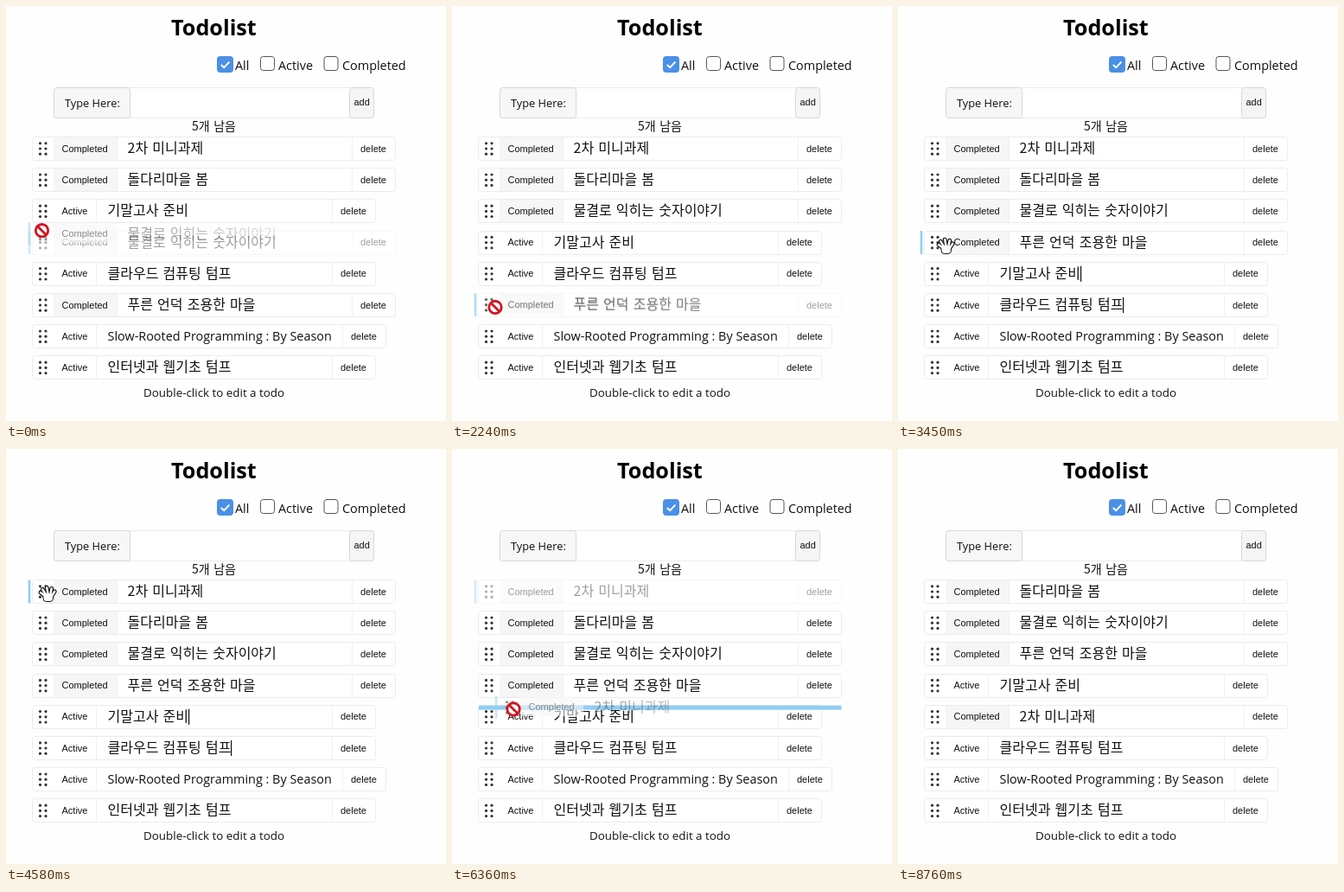
These frames come from a looping animation (509 px wide and 480 px high, 8.79 s). An HTML page with a canvas:

```html
<!DOCTYPE html>
<html lang="ko">
<head>
<meta charset="utf-8">
<title>Todolist</title>
<style>
html, body { margin: 0; width: 100%; height: 100%; overflow: hidden; background: #fefefe; }
canvas { display: block; }
</style>
</head>
<body>
<canvas id="stage" width="509" height="480"></canvas>
<script>
const ctx = document.getElementById('stage').getContext('2d');
const LOOP = 8790;
const PITCH = 36.2;
const BLUE = '#92cdf3';
const INK = '#111';
const KOREAN = '"Noto Sans CJK KR", "Noto Sans CJK", sans-serif';
const LATIN = '"Open Sans", "Noto Sans", sans-serif';
const BUTTON = '11px "Liberation Sans", Arial, sans-serif';

const todos = [
  { text: '2차 미니과제', done: true },
  { text: '돌다리마을 봄', done: true },
  { text: '기말고사 준비', caretFrom: 2700 },
  { text: '물결로 익히는 숫자이야기', done: true },
  { text: '클라우드 컴퓨팅 텀프', caretFrom: 3170 },
  { text: '푸른 언덕 조용한 마을', done: true },
  { text: 'Slow-Rooted Programming : By Season', latin: true },
  { text: '인터넷과 웹기초 텀프' },
];

// Each drag carries a row from one gap between rows to another.
const drags = [
  { start: -33, end: 890, row: 3, gap: 2, grab: { x: 41.5, y: 269.5 }, drop: { x: 47, y: 227 } },
  { start: 2240, end: 3170, row: 5, gap: 3, grab: { x: 50, y: 349 }, drop: { x: 54, y: 277 } },
  { start: 4950, end: 7060, row: 0, gap: 5, grab: { x: 47, y: 167 }, drop: { x: 75.6, y: 301 } },
];
const cursorGone = 7450;

const rowY = i => 165 + PITCH * i;
const gapY = i => 147 + PITCH * i;
const mix = (a, b, k) => a + (b - a) * k;
const progress = (t, from, to) => Math.min(1, Math.max(0, (t - from) / (to - from)));
const smooth = k => k * k * (3 - 2 * k);
const dash = k => 1 - (1 - k) ** 7;
const glide = u => smooth(progress(u, 0.34, 0.78));

function cursorAt(t) {
  const i = drags.findLastIndex(d => t >= d.start);
  const { start, end, grab, drop } = drags[i];
  if (t < end) {
    const u = progress(t, start, end);
    return { x: mix(grab.x, drop.x, glide(u)), y: mix(grab.y, drop.y, dash(u)) };
  }
  const next = drags[i + 1];
  if (!next) return drop;
  const k = smooth(progress(progress(t, end, next.start), 0.15, 0.75));
  return { x: mix(drop.x, next.grab.x, k), y: mix(drop.y, next.grab.y, k) };
}

function orderAt(t) {
  const order = [...todos];
  for (const { end, row, gap } of drags) {
    if (t < end) break;
    const [moved] = order.splice(row, 1);
    order.splice(gap > row ? gap - 1 : gap, 0, moved);
  }
  return order;
}

function label(text, x, y, font, color = INK, spacing = 0) {
  ctx.font = font;
  ctx.fillStyle = color;
  ctx.wordSpacing = spacing + 'px';
  ctx.fillText(text, x, y);
}

function box(x, y, w, h, radius, fill, stroke) {
  ctx.beginPath();
  ctx.roundRect(x, y, w, h, radius);
  ctx.fillStyle = fill;
  ctx.fill();
  if (!stroke) return;
  ctx.lineWidth = 1;
  ctx.strokeStyle = stroke;
  ctx.stroke();
}

function rect(x, y, w, h, fill) {
  ctx.fillStyle = fill;
  ctx.fillRect(x, y, w, h);
}

function line(points, width, color) {
  ctx.beginPath();
  points.forEach(([x, y]) => ctx.lineTo(x, y));
  ctx.lineWidth = width;
  ctx.strokeStyle = color;
  ctx.stroke();
}

function itemText({ text, done, latin }, y, color) {
  const x = done ? 140.5 : 117.5;
  if (latin) label(text, x, y + 5, '14.4px ' + LATIN, color);
  else label(text, x, y + 5, '16px ' + KOREAN, color, 1.6);
  return x + ctx.measureText(text).width;
}

function handleDots(y, color) {
  ctx.fillStyle = color;
  for (let i = 0; i < 6; i++) {
    ctx.beginPath();
    ctx.arc(39.5 + 6.5 * (i % 2), y + 6.2 * (Math.floor(i / 2) - 1), 1.6, 0, 7);
    ctx.fill();
  }
}

function drawRow(item, y, hovered, caret) {
  const { done, latin } = item;
  const top = Math.round(y - 14) + 0.5;
  const chipEnd = done ? 128 : 104;
  const right = done ? 450.5 : latin ? 439.5 : 427.5;
  box(30.5, top, right - 30.5, 27, 3, '#fff', '#ececec');
  if (done) rect(55, top + 0.5, chipEnd - 55, 26, '#f6f6f6');
  for (const x of [chipEnd, right - 50.5]) rect(x, top + 0.5, 1, 26, '#f0f0f0');
  handleDots(y, '#333');
  label(done ? 'Completed' : 'Active', 64.5, y + 3.5, BUTTON);
  label('delete', right - 40.5, y + 3.5, BUTTON);
  const end = itemText(item, y, INK);
  if (caret) rect(Math.round(end), y - 9, 1.2, 18, INK);
  if (hovered) rect(25.7, y - 13.5, 2.6, 27, BLUE);
}

function drawGhost(item, dx, y) {
  const fade = (rgb, alpha) => {
    const gradient = ctx.createLinearGradient(100, 0, 390, 0);
    gradient.addColorStop(0, `rgba(${rgb},${alpha})`);
    gradient.addColorStop(1, `rgba(${rgb},0)`);
    return gradient;
  };
  const ink = fade('20,20,20', 0.48);
  ctx.save();
  ctx.translate(dx, 0);
  rect(25.7, y - 13, 2.6, 26, fade('146,205,243', 0.5));
  rect(55, y - 13, 73, 23, fade('247,247,247', 0.62));
  handleDots(y, ink);
  label('Completed', 64.5, y + 3.5, BUTTON, ink);
  itemText(item, y, ink);
  ctx.restore();
}

function drawNoDrop({ x, y }) {
  const red = '#cf1620';
  ctx.beginPath();
  ctx.arc(x, y, 7.2, 0, 7);
  ctx.fillStyle = '#fff';
  ctx.fill();
  ctx.lineWidth = 2.8;
  ctx.strokeStyle = red;
  ctx.stroke();
  line([[x - 5, y - 5], [x + 5, y + 5]], 2.8, red);
}

function drawHand({ x, y }) {
  const fingers = Array.from({ length: 5 }, (_, i) => {
    const angle = mix(-2.5, -1, i / 4);
    const length = 5 + 4 * Math.sin(Math.PI * i / 4);
    const baseX = -4 + 2.4 * i, baseY = 2;
    return [[baseX, baseY], [baseX + length * Math.cos(angle), baseY + length * Math.sin(angle)]];
  });
  ctx.save();
  ctx.translate(x + 1, y);
  ctx.lineCap = 'round';
  for (const finger of fingers) line(finger, 4.8, INK);
  box(-5, 0, 11.5, 9.5, 3.5, '#fff', INK);
  for (const finger of fingers) line(finger, 2.5, '#fff');
  ctx.restore();
}

function drawPage() {
  const body = '14.4px ' + LATIN;
  label('Todolist', 191, 34, 'bold 25.2px ' + LATIN, '#000');
  box(244, 58, 19, 19, 4, '#4a90e6');
  line([[248.8, 68], [252.2, 71.2], [258.4, 64.6]], 2, '#fff');
  for (const x of [294.5, 368]) box(x, 58.5, 16, 16, 3, '#fff', '#555');
  label('All', 265, 73.5, body);
  label('Active', 315, 73.5, body);
  label('Completed', 389, 73.5, body);

  box(55.5, 94.5, 370, 35, 3, '#fff', '#ebebeb');
  box(55.5, 94.5, 88, 35, 3, '#f7f7f7', '#d8d8d8');
  box(397.5, 94.5, 28, 35, 3, '#f5f5f5', '#d8d8d8');
  label('Type Here:', 68, 117, '12.8px ' + LATIN);
  label('add', 402.5, 115, BUTTON);
  label('5개 남음', 215, 144, '14px ' + KOREAN, INK, 1.4);
  label('Double-click to edit a todo', 159, 452, '13.4px ' + LATIN);
}

function draw(t) {
  rect(0, 0, 509, 480, '#fefefe');
  drawPage();

  const cursor = cursorAt(t);
  const drag = drags.find(d => t >= d.start && t < d.end);
  const order = orderAt(t);
  const pointsAt = y => !drag && t < cursorGone && cursor.x < 56 && Math.abs(cursor.y - y) < 14;

  order.forEach((item, i) => {
    const held = drag?.row === i;
    const caret = t >= item.caretFrom && t < drags[2].start;
    ctx.globalAlpha = held ? 0.4 : 1;
    drawRow(item, rowY(i), held || pointsAt(rowY(i)), caret);
  });
  ctx.globalAlpha = 1;

  if (drag) {
    const { start, end, row, gap, grab } = drag;
    const u = progress(t, start, end);
    if (u > 0.2) rect(31, gapY(mix(row, gap, glide(u))) - 2.5, 419.5, 5, BLUE);
    drawGhost(order[row], cursor.x - grab.x, rowY(row) + cursor.y - grab.y);
    drawNoDrop(cursor);
  } else if (t < cursorGone) {
    drawHand(cursor);
  }
}

const begin = performance.now();
function tick() {
  draw((performance.now() - begin) % LOOP);
  requestAnimationFrame(tick);
}
tick();
</script>
</body>
</html>
```
